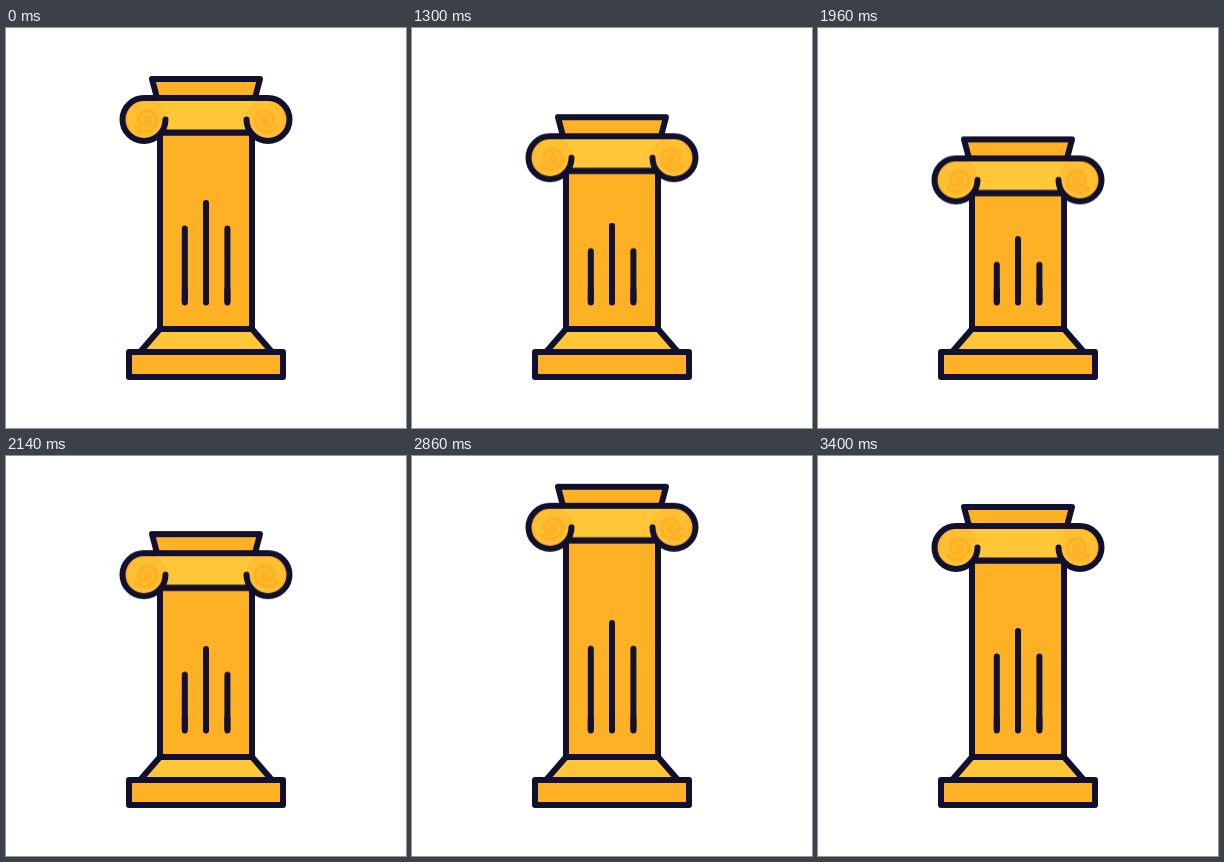
An HTML page for the animation above (3430 ms loop, 400x400 px).

```html
<!DOCTYPE html>
<html lang="en">
<head>
<meta charset="utf-8">
<title>Column</title>
<style>
  html, body { margin: 0; width: 100%; height: 100%; overflow: hidden; background: #fff; }
  svg { display: block; width: 100%; height: 100%; }
  .ink { stroke: #12102f; stroke-width: 6; stroke-linecap: round; stroke-linejoin: round; fill: none; }
  .deep { fill: #ffb125; }
  .light { fill: #ffc738; }
</style>
</head>
<body>
<svg viewBox="0 0 400 400">
  <defs>
    <clipPath id="shaftClip"><rect width="400" height="301"/></clipPath>
    <clipPath id="fluteClip"><rect width="400" height="274"/></clipPath>
    <g id="scroll">
      <circle class="deep" cx="138" cy="91.5" r="21.5"/>
      <circle cx="140.5" cy="91.5" r="19" fill="#ffbf32"/>
      <path d="M138.5 92a3 3 0 0 1 6 0a6 6 0 0 1-12 0a9 9 0 0 1 18 0a12 12 0 0 1-21 7"
        fill="none" stroke="#ffb125" stroke-width="3.6" stroke-linecap="round"/>
      <circle class="deep" cx="141.5" cy="92" r="4.5"/>
    </g>
  </defs>

  <g clip-path="url(#shaftClip)">
    <rect class="ink deep cap" x="154" y="104.5" width="92" height="240"/>
  </g>

  <g clip-path="url(#fluteClip)">
    <path class="ink flute" d="M178.8 200.5V330M200 175V330M221.4 200.5V330"/>
  </g>
  <path class="ink" d="M178.8 262V274.5M200 262V274.5M221.4 262V274.5"/>

  <path class="ink light" d="M154 301H246L266 324H134Z"/>
  <rect class="ink deep" x="123" y="324" width="154" height="25"/>

  <g class="cap">
    <path class="ink deep" d="M146 51H254L249 70H151Z"/>
    <path class="light" d="M138 70H262V104.5H138Z"/>
    <use href="#scroll"/>
    <use href="#scroll" transform="matrix(-1 0 0 1 400 0)"/>
    <path class="ink" d="M156 104.5H244"/>
    <path class="ink" d="M159.5 91.5A21.5 21.5 0 1 1 138 70H262A21.5 21.5 0 1 1 240.5 91.5"/>
  </g>
</svg>
<script>
  const LOOP = 3430;
  // time in ms, capital shift, flute shift
  const steps = [
    [0, 0, 0],
    [985, 0, 0],
    [1600, 70, 41.5],
    [1662, 70, 41.5],
    [2640, -22, -8.5],
    [LOOP, 0, 0]
  ];

  function move(selector, column) {
    const frames = steps.map(step => ({
      offset: step[0] / LOOP,
      transform: `translateY(${step[column]}px)`,
      easing: 'cubic-bezier(.7, 0, .3, 1)'
    }));
    for (const el of document.querySelectorAll(selector)) {
      el.animate(frames, { duration: LOOP, iterations: Infinity });
    }
  }

  move('.cap', 1);
  move('.flute', 2);
</script>
</body>
</html>
```
